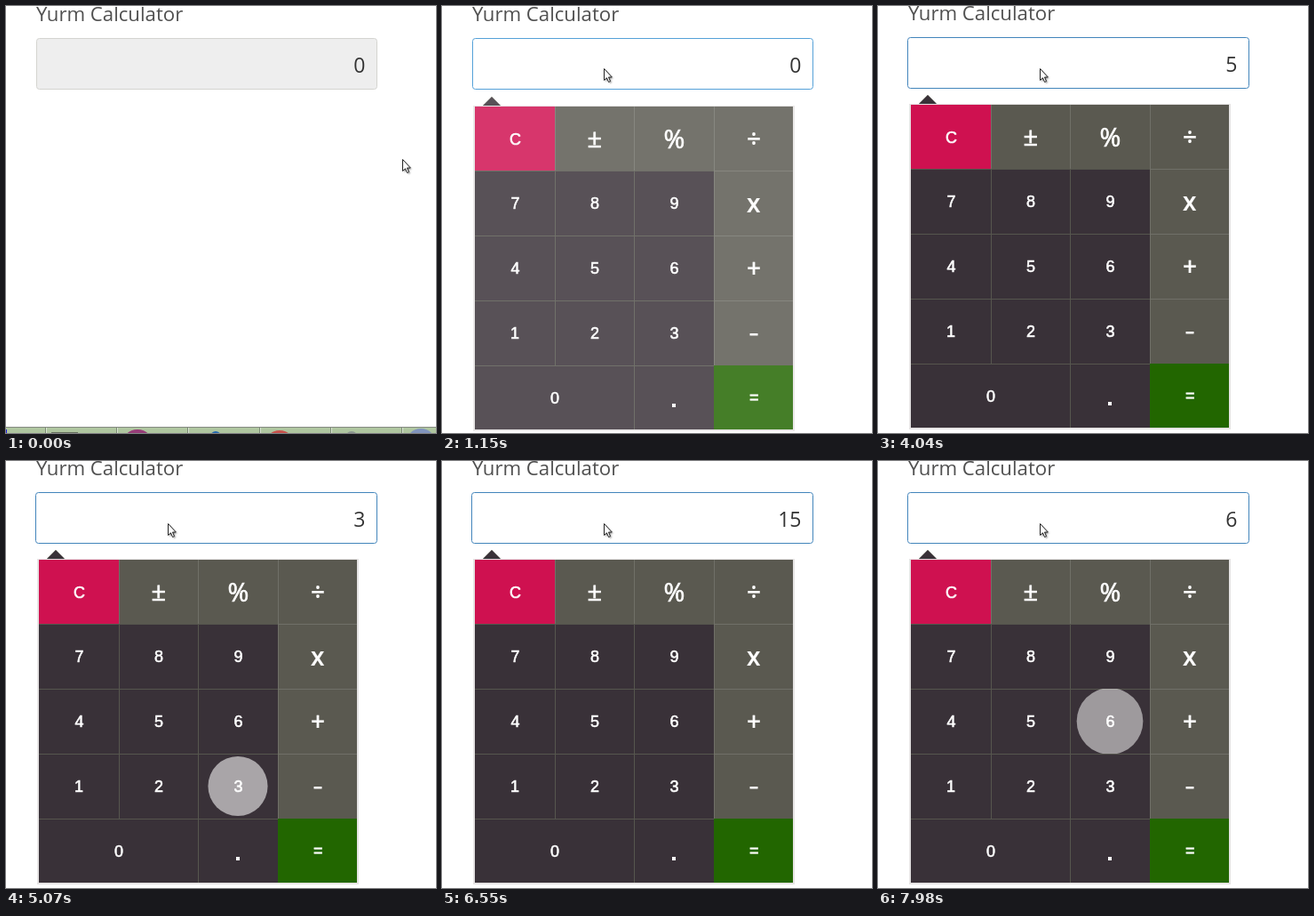
Recreate the animation shown at these times as an HTML page with a canvas. Size 484 px wide and 480 px high, loop 8000 ms.

```html
<!DOCTYPE html>
<html lang="en">
<head>
<meta charset="utf-8">
<title>Calculator</title>
<style>
  html, body { margin: 0; width: 100%; height: 100%; overflow: hidden; background: #fff; }
  canvas { display: block; }
</style>
</head>
<body>
<canvas id="stage" width="484" height="480"></canvas>
<script>
const ctx = document.getElementById('stage').getContext('2d');
const LOOP = 8000;
const RIPPLE = 450;
const OPEN_AT = 970;
const SETTLE_AT = 1780;

const SANS = '"Open Sans", "Noto Sans", sans-serif';
const ARIAL = '"Liberation Sans", Arial, sans-serif';
const COLUMNS = [37, 127, 216, 306, 395];
const ROWS = [111, 183, 256, 329, 402, 474];
const LAYOUT = ['C±%÷', '789x', '456+', '123-', '00.='];

const keys = {};
LAYOUT.forEach((row, r) => [...row].forEach((label, c) => {
  const left = COLUMNS[row.indexOf(label)], right = COLUMNS[c + 1];
  keys[label] = { x: left, y: ROWS[r], w: right - left, h: ROWS[r + 1] - ROWS[r] };
}));

// Key presses: ripple start, the moment it becomes visible, and the display after it
const presses = [
  { at: 1390, key: '5', display: '5' },
  { at: 4040, visible: 4340, key: 'x', display: '5' },
  { at: 4920, key: '3', display: '3' },
  { at: 5670, key: '=', display: '15' },
  { at: 6550, key: '+', display: '15' },
  { at: 7800, key: '6', display: '6' }
];

const clamp = v => Math.max(0, Math.min(1, v));
const progress = (t, start, length) => clamp((t - start) / length);

function rect(color, x, y, w, h) {
  ctx.fillStyle = color;
  ctx.fillRect(x, y, w, h);
}

function disc(color, x, y, r) {
  ctx.fillStyle = color;
  ctx.beginPath();
  ctx.arc(x, y, r, 0, 2 * Math.PI);
  ctx.fill();
}

function polygon(points) {
  ctx.beginPath();
  points.forEach(([x, y]) => ctx.lineTo(x, y));
  ctx.closePath();
}

function text(label, x, y, font, color, align) {
  ctx.font = font;
  ctx.fillStyle = color;
  ctx.textAlign = align;
  ctx.fillText(label, x, y);
}

// Centres the inked part of a label on a point
function centredLabel(label, x, y, font, weight) {
  ctx.font = font;
  ctx.textAlign = 'left';
  const m = ctx.measureText(label);
  const left = x + (m.actualBoundingBoxLeft - m.actualBoundingBoxRight) / 2;
  const base = y + (m.actualBoundingBoxAscent - m.actualBoundingBoxDescent) / 2;
  ctx.fillStyle = ctx.strokeStyle = '#fff';
  ctx.fillText(label, left, base);
  ctx.lineWidth = weight;
  ctx.strokeText(label, left, base);
}

function drawTaskbar() {
  rect('#858a82', 0, 473, 484, 1);
  rect('#afc6a0', 0, 474, 484, 6);
  for (let x = 45; x < 484; x += 80.2) {
    const left = Math.round(x);
    rect('#7b8a74', left - 1, 474, 1, 6);
    rect('#dce6d5', left, 474, 1, 6);
  }
  rect('#2020e0', 0, 476, 1, 4);
  rect('#66705f', 51, 479, 30, 1);
  disc('#963c78', 148, 494, 18);
  disc('#2468b0', 236, 484, 6);
  disc('#c8514c', 308, 494, 17);
  disc('#8b9690', 389, 485, 7);
  disc('#8194bd', 467, 492, 17);
}

function drawInput(t, dy, display) {
  const left = t < SETTLE_AT ? 34.5 : 33.5;
  const grey = 238 + 17 * progress(t, OPEN_AT, 150);
  ctx.fillStyle = `rgb(${grey},${grey},${grey})`;
  ctx.strokeStyle = t < OPEN_AT ? '#d4d4d0' : t < SETTLE_AT ? '#55a1d8' : '#4285bb';
  ctx.lineWidth = 1;
  ctx.beginPath();
  ctx.roundRect(left, 35.5 + dy, 417.5 - left, 57, 3);
  ctx.fill();
  ctx.stroke();
  text('Yurm Calculator', 34, 16 + dy, `22.2px ${SANS}`, '#505050', 'left');
  text(display, 404.5, 73.5 + dy, `23px ${SANS}`, '#333', 'right');
}

function drawKey(label) {
  const { x, y, w, h } = keys[label];
  const isOperator = '±%÷x+-'.includes(label);
  const fill = label === 'C' ? '#cf1150' : label === '=' ? '#226600'
    : isOperator ? '#5a5950' : '#393138';
  rect(fill, x, y, w, h);

  ctx.fillStyle = isOperator ? '#707068' : '#56564e';
  if (x > 37 && label !== '=') ctx.fillRect(x, y, 1, h);
  if (y > 111 && label !== '=') ctx.fillRect(x, y, w, 1);

  const cx = x + w / 2 + 0.5, cy = y + h / 2;
  if (label === '.') rect('#fff', 259, 445, 4, 4);
  else if (label === '-') rect('#fff', 346.5, 366, 9, 2.5);
  else if (label === '±' || label === '%') centredLabel(label, cx, cy + 0.5, `29px ${SANS}`, 0.7);
  else if (isOperator) centredLabel(label, cx, cy + (label === 'x' ? 2.5 : 0), `600 28px ${SANS}`, 0.2);
  else centredLabel(label, cx, cy, `18px ${ARIAL}`, 0.6);
}

function drawRipple(press, t) {
  const p = (t - press.at) / RIPPLE;
  if (p < 0 || p >= 1 || t < (press.visible || 0)) return;
  const { x, y, w, h } = keys[press.key];
  ctx.save();
  ctx.beginPath();
  ctx.rect(x, y, w, h);
  ctx.clip();
  disc(`rgba(255,255,255,${0.85 * (1 - p)})`, x + w / 2, y + h / 2, 47.5 * (1 - (1 - p) ** 3));
  ctx.restore();
}

function drawPad(t, dy) {
  const shown = 1 - (1 - progress(t, OPEN_AT, 300)) ** 2;
  ctx.save();
  ctx.translate(0, dy + Math.round(6 * (1 - shown)));
  polygon([[56, 100], [66.5, 110.5], [45.5, 110.5]]);
  ctx.fillStyle = '#393138';
  ctx.fill();
  ctx.strokeStyle = '#77776f';
  ctx.lineWidth = 0.7;
  ctx.stroke();
  rect('#e6e4e4', 35, 110, 362, 366);
  Object.keys(keys).forEach(drawKey);
  presses.forEach(press => drawRipple(press, t));
  ctx.restore();
  rect(`rgba(255,255,255,${1 - shown})`, 0, 96, 484, 384);
}

function drawPointer(t) {
  const p = progress(t, 270, 470);
  const ease = p * p * (3 - 2 * p);
  ctx.save();
  ctx.translate(446.5 - 264 * ease, 172.5 - 102 * ease);
  polygon([[0, 0], [0, 13], [3, 10.3], [5, 15], [7, 14], [5, 9.5], [8.8, 9.5]]);
  ctx.shadowColor = 'rgba(0,0,0,0.45)';
  ctx.shadowBlur = 2;
  ctx.shadowOffsetX = ctx.shadowOffsetY = 1.5;
  ctx.fillStyle = '#fff';
  ctx.fill();
  ctx.shadowColor = 'transparent';
  ctx.strokeStyle = '#222';
  ctx.lineWidth = 1;
  ctx.stroke();
  ctx.restore();
}

function draw(t) {
  const dy = t < SETTLE_AT ? 1 : 0;
  const last = presses.filter(press => t >= press.at).pop();
  rect('#fff', 0, 0, 484, 480);
  if (t < OPEN_AT) drawTaskbar();
  else drawPad(t, dy);
  drawInput(t, dy, last ? last.display : '0');
  drawPointer(t);
}

const start = performance.now();
function frame() {
  draw((performance.now() - start) % LOOP);
  requestAnimationFrame(frame);
}
frame();
</script>
</body>
</html>
```
